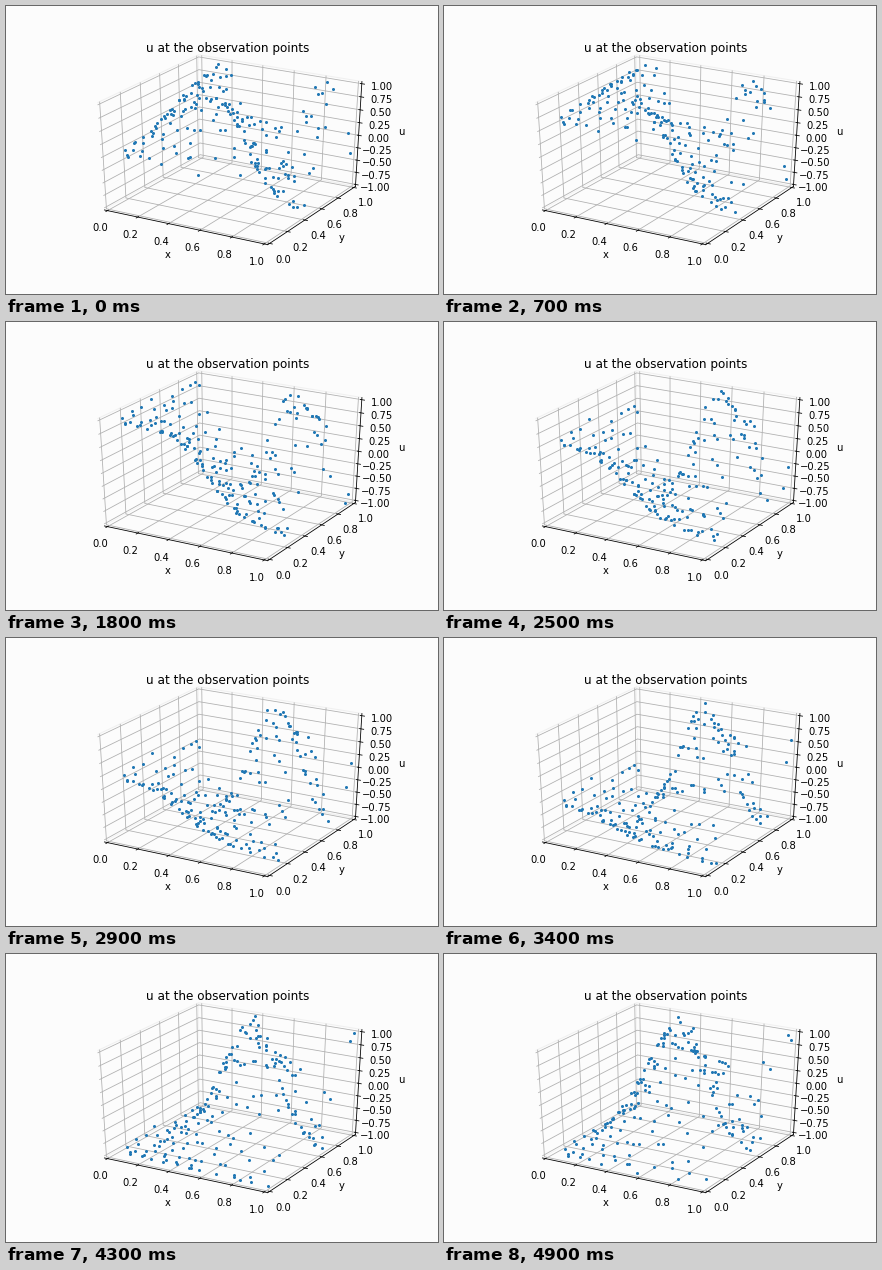
Write a matplotlib script that moves like this. It is 432 px wide and 288 px high and loops after 5 s.

```python
import numpy as np
import matplotlib.pyplot as plt
from matplotlib.animation import FuncAnimation

FRAMES, INTERVAL = 50, 100
CELLS = 14
PAPER = "#fcfcfc"
MARGIN = 1 / 48

# The outermost sites, near the left and right corners of the view.
CORNERS = [(.045, .115), (.10, .055), (.115, .035), (.99, .986), (.99, .942)]


def observation_points():
    """One random site per grid cell, leaving the two side corners sparse."""
    rng = np.random.default_rng(7)
    cells = np.indices((CELLS, CELLS)).reshape(2, -1)
    x, y = (cells + rng.random(cells.shape)) / CELLS
    across = .866 * x + .5 * y
    inner = (across > .13) & (across < 1.24)
    return np.hstack([np.transpose(CORNERS), [x[inner], y[inner]]])


def wave(x, y, t):
    return np.sin(10 * x * y + t)


def make_axes(fig):
    ax = fig.add_subplot(projection="3d")
    # Let the cube stretch over the whole subplot instead of a square.
    ax.apply_aspect = lambda position=None: None
    ax.set_box_aspect((1, 1, 1), zoom=np.sqrt(3) / 1.8294640721620434)
    ax.view_init(elev=30, azim=-60)
    ax.set_facecolor("none")
    for axis in (ax.xaxis, ax.yaxis, ax.zaxis):
        axis.pane.set(facecolor=PAPER, edgecolor="#f0f0f0", alpha=1)
    return ax


fig = plt.figure(figsize=(6, 4), dpi=72, facecolor=PAPER)
fig.subplots_adjust(left=.125, right=.9, bottom=.125, top=.88)
ax = make_axes(fig)

px, py = observation_points()
dots, = ax.plot(px, py, wave(px, py, 0), "o", color="#1f77b4", markersize=2)

unit = (-MARGIN, 1 + MARGIN)
ax.set(xlim=unit, ylim=unit, zlim=(-1 - 2 * MARGIN, 1 + 2 * MARGIN))
ax.set_xticks(np.linspace(0, 1, 6))
ax.set_yticks(np.linspace(0, 1, 6))
ax.set_zticks(np.linspace(-1, 1, 9))
ax.set(xlabel="x", ylabel="y", zlabel="u")
ax.set_title("u at the observation points", y=1)


def update(frame):
    t = frame * INTERVAL / 1000
    dots.set_data_3d(px, py, wave(px, py, t))
    return dots,


anim = FuncAnimation(fig, update, frames=FRAMES, interval=INTERVAL,
                     repeat=True, repeat_delay=0)
plt.show()
```
